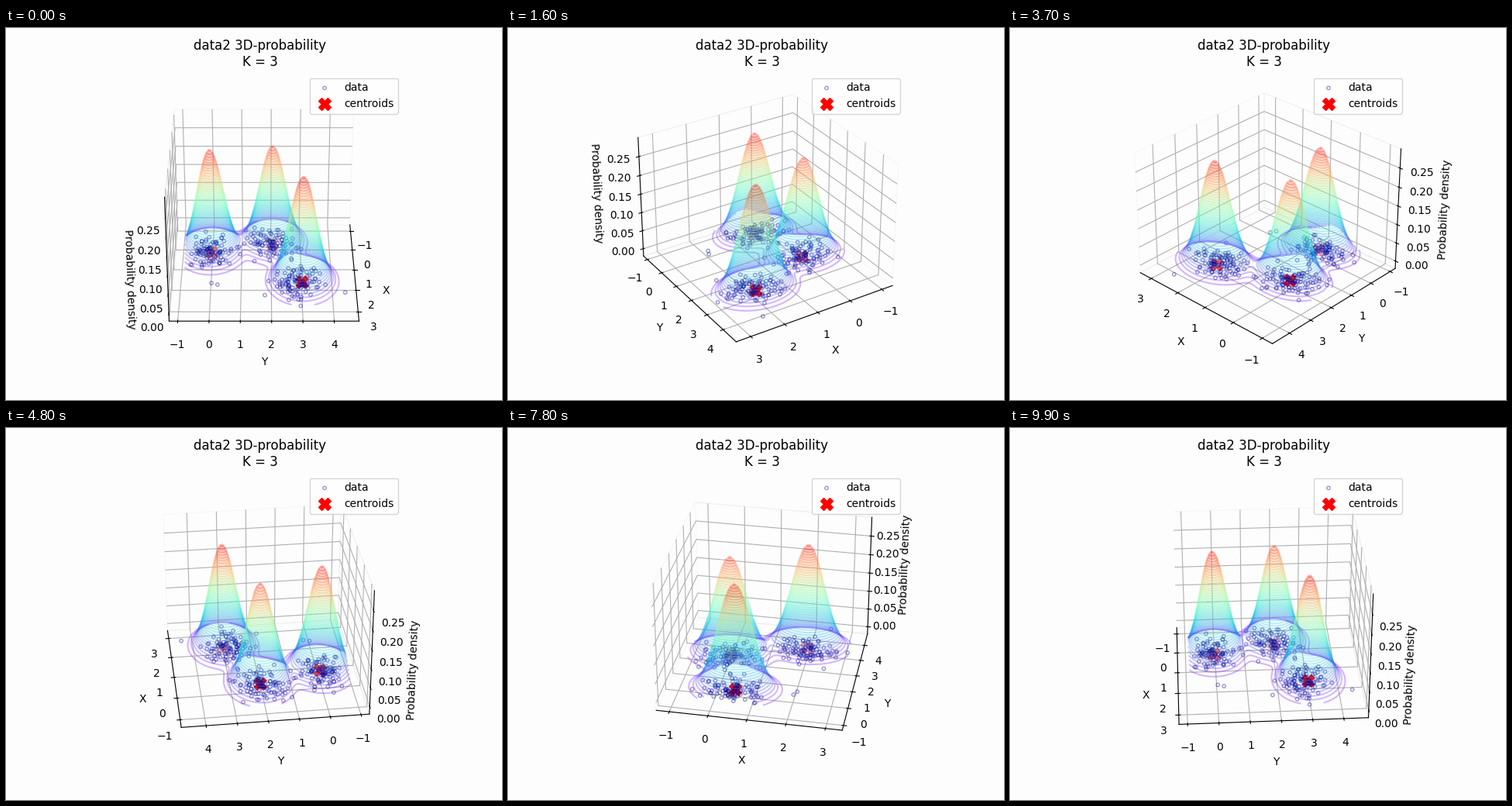
A matplotlib script that plays this animation: 640 px wide and 480 px high, repeating every 10 s.

```python
import numpy as np
import matplotlib.pyplot as plt
from matplotlib.animation import FuncAnimation

FRAMES = 100
BACKGROUND = "#fdfdfd"
LOW = np.array([-1.038, -0.888])
HIGH = np.array([3.118, 4.405])
Z_MAX = 0.2795
STEP = 0.006
SPREAD = 0.435
PEAKS = {(0.51, -0.03): 0.2772, (0.05, 2.04): 0.2655, (1.97, 3.01): 0.2785}
CENTRES = np.array(list(PEAKS))
OUTLIERS = [(2.01, 0.03), (2.08, 0.23), (2.45, 4.40)]


def density(x, y):
    return sum(peak * np.exp(-((x - cx) ** 2 + (y - cy) ** 2) / (2 * SPREAD ** 2))
               for (cx, cy), peak in PEAKS.items())


def sample_points(rng, per_cluster=100):
    clusters = np.repeat(CENTRES, per_cluster, axis=0)
    points = clusters + rng.normal(0, SPREAD, clusters.shape)
    inside = np.all((points > LOW) & (points < HIGH), axis=1)
    return np.vstack([points[inside], OUTLIERS])


def padded(lo, hi):
    # 5 % data margin, then 1/48 of the result on each side
    pad = (hi - lo) * (1.1 * 25 / 24 - 1) / 2
    return lo - pad, hi + pad


fig = plt.figure(figsize=(6.4, 4.8), dpi=100, facecolor=BACKGROUND)
ax = fig.add_subplot(projection="3d", facecolor=BACKGROUND)

x, y = sample_points(np.random.default_rng(7)).T
ax.scatter(x, y, 0, s=10, facecolors="none", edgecolors="darkblue",
           linewidths=1, alpha=0.4, label="data")
ax.scatter(*CENTRES.T, 0, s=130, c="red", marker="X", label="centroids")

gx, gy = np.meshgrid(np.linspace(LOW[0], HIGH[0], 90),
                     np.linspace(LOW[1], HIGH[1], 90))
ax.contour3D(gx, gy, density(gx, gy), levels=np.arange(STEP, Z_MAX, STEP),
             cmap="rainbow", vmin=0, vmax=0.282, alpha=0.3)

ax.set(xlim=padded(LOW[0], HIGH[0]), ylim=padded(LOW[1], HIGH[1]),
       zlim=padded(0, Z_MAX), xlabel="X", ylabel="Y",
       zlabel="Probability density", title="data2 3D-probability\nK = 3")
for axis in (ax.xaxis, ax.yaxis, ax.zaxis):
    axis.pane.set_fill(False)
ax.legend()


def update(i):
    # The tiny offset keeps the axes on a fixed side in face-on views
    ax.view_init(elev=30, azim=i * 360 / FRAMES + 0.001)
    return []


anim = FuncAnimation(fig, update, frames=FRAMES, interval=100,
                     init_func=lambda: update(0), repeat=True, repeat_delay=0)
plt.show()
```
